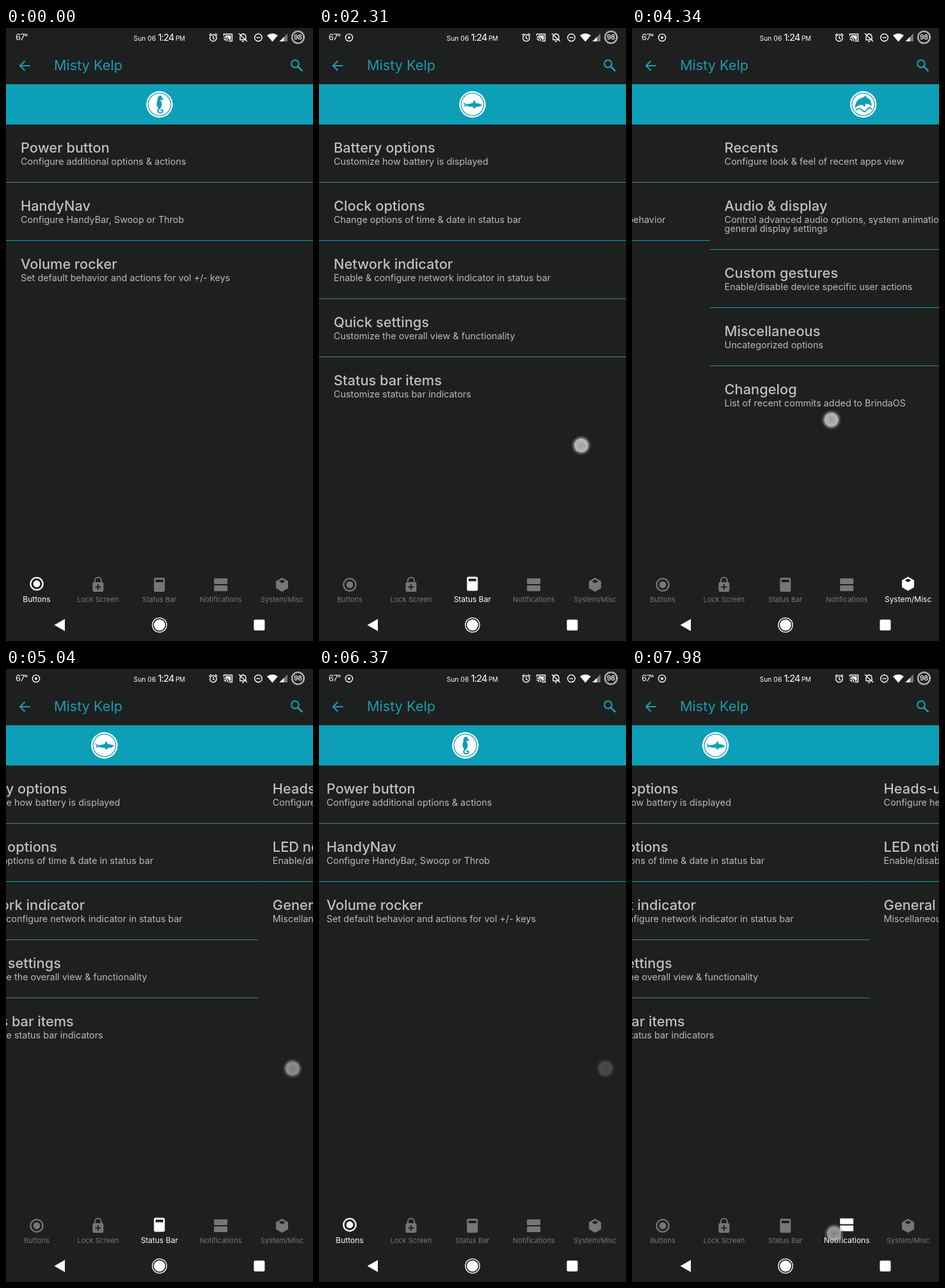
An HTML page for the animation above (8 s loop, 480 px wide and 959 px high).

```html
<!DOCTYPE html>
<html lang="en">
<head>
<meta charset="utf-8">
<title>Settings pager</title>
<style>
  html, body { margin: 0; width: 100%; height: 100%; overflow: hidden; background: #1d201f; }
  svg { display: block; width: 100%; height: 100%; font-family: Inter, "Open Sans", sans-serif; }
  .accent { fill: #1b9bb0; }
  .line { fill: none; stroke: currentColor; }
  .title { font-size: 21.8px; font-weight: 500; fill: #bec1bf; }
  .note { font-size: 14.4px; fill: #b8bbb9; }
  .tab { color: #747776; fill: currentColor; }
  .tab text { font-size: 11px; text-anchor: middle; }
  .tab.on { color: #fff; }
  .tab.on text { font-size: 12px; }
  .tab.on .icon { transform: translateY(-1.5px); }
  .status { color: #fff; fill: currentColor; }
  .hole { fill: #1d201f; }
  .badge { color: #0d9fb7; fill: currentColor; }
</style>
</head>
<body>
<svg viewBox="0 0 480 959" preserveAspectRatio="none">
  <defs>
    <radialGradient id="glow">
      <stop offset="0" stop-color="#a4a6a4" stop-opacity=".95"/>
      <stop offset=".62" stop-color="#bfc1bf" stop-opacity=".95"/>
      <stop offset=".72" stop-color="#a5a7a5" stop-opacity=".6"/>
      <stop offset="1" stop-color="#777" stop-opacity="0"/>
    </radialGradient>
  </defs>
  <rect width="480" height="959" fill="#1d201f"/>

  <g class="status">
    <text x="15" y="19" font-size="13" letter-spacing="-.9">67°</text>
    <g id="recording">
      <circle class="line" cx="47" cy="15" r="5.6" stroke-width="1.4"/>
      <circle cx="47" cy="15" r="2"/>
    </g>
    <text x="199.5" y="19.5" font-size="10.4">Sun 06</text>
    <text x="237.5" y="19.5" font-size="15" letter-spacing="-1">1:24</text>
    <text x="265" y="19.5" font-size="10" letter-spacing="-.3">PM</text>
    <g class="line" stroke-width="1.4">
      <circle cx="324" cy="15.5" r="5.2"/>
      <path d="M324 12v4l2.5 1.5M317.5 11.5l3.5-3M330.5 11.5l-3.5-3"/>
      <path d="M340.5 12V9.5h13v11h-5M340.5 14a7 7 0 0 1 6.5 6.5M340.5 17a4 4 0 0 1 3.5 3.5"/>
      <path d="M366 18.5v-4.5q0-4.5 4.5-4.5t4.5 4.5v4.5zM364 8.5l13 12.5M370.5 8v1.5M369 21h3"/>
      <circle cx="394.5" cy="15" r="5.8"/>
      <path d="M391.5 15h6"/>
    </g>
    <path d="M343 11.5h8.5v7H349q-1-4-6-5z"/>
    <path d="M408 11.5q8.5-6 17 0l-8.500 10z"/>
    <path d="M440 8.5v12.5h-12.5z" opacity=".4"/>
    <path d="M434.500 14v7h-7z"/>
    <circle class="line" cx="456.5" cy="14.5" r="9.3" stroke-width="2.6" stroke-dasharray="1.5 .84"/>
    <text x="456.2" y="18.4" font-size="10.8" font-weight="500" text-anchor="middle" letter-spacing="-.5">98</text>
  </g>

  <g class="accent" color="#1b9bb0">
    <path class="line" d="M37.5 59H22.5M29.5 51.5L22 59l7.5 7.5" stroke-width="2.2"/>
    <text x="75" y="66" font-size="21.7">Misty Kelp</text>
    <circle class="line" cx="452" cy="56" r="5.8" stroke-width="2.2"/>
    <path class="line" d="M456 60l7.5 7.5" stroke-width="2.6"/>
  </g>

  <rect y="88" width="480" height="63" fill="#0d9fb7"/>
  <g id="pages"></g>
  <g id="tabs"></g>

  <g fill="#fff">
    <path d="M92 924.5v19L75.5 934z"/>
    <circle cx="240" cy="934" r="8.8"/>
    <circle cx="240" cy="934" r="11.2" fill="none" stroke="#fff" stroke-width="1.3"/>
    <rect x="387.5" y="925.5" width="17" height="17" rx="2"/>
  </g>
  <circle id="touch" r="16" fill="url(#glow)"/>
</svg>

<script>
const WIDTH = 480, LOOP = 8000, STEP = 70, SLOP = 19, FADE = 250;

const pages = [
  { tab: 'Buttons',
    icon: '<circle class="line" r="9.6" stroke-width="2.3"/><circle r="5.4"/>',
    badge: `<path d="M-1-13Q4-15 4-10L7-7 1-7Q5-2 3 3 2 7-1 8L-3 4Q-6 0-3-6-4-10-1-13Z"/>
      <path class="line" d="M0 5Q-5 11 0 13 5 14 5 10 3 7 2 10" stroke-width="2"/>`,
    items: [['Power button', 'Configure additional options &amp; actions'],
      ['HandyNav', 'Configure HandyBar, Swoop or Throb'],
      ['Volume rocker', 'Set default behavior and actions for vol +/- keys']] },
  { tab: 'Lock Screen',
    icon: `<rect x="-8.5" y="-4" width="17" height="15" rx="2"/>
      <path class="line" d="M-5-3v-3.5a5 5 0 0 1 10 0V-3" stroke-width="2"/>
      <path class="hole" d="M-1-1h2v3.5h3.5v2H1V8h-2V4.5h-3.5v-2H-1z"/>`,
    badge: `<ellipse cx="3" cy="-6" rx="6.5" ry="6"/>
      <path class="line" d="M0-2Q-4 2-8 0T-13 3M1 0Q-3 8-10 7M3 0Q2 10-3 11M5-1Q4 8 9 10M7-2Q8 4 13 4" stroke-width="2.8"/>`,
    items: [['Lockscreen clocks', 'Customize your view of date &amp; time on the lockscreen'],
      ['Weather options', 'Configure lockscreen weather'],
      ['General options', 'Add or remove visual elements of your lockscreen']] },
  { tab: 'Status Bar',
    icon: `<rect x="-8.5" y="-11" width="17" height="22" rx="2.5"/>
      <rect class="hole" x="-6" y="-8" width="12" height="4"/>`,
    badge: '<path d="M-15-4L-10 0Q-4-1 0-2L3-7 5-2Q11-2 15 1 12 4 6 4L2 7 1 4Q-5 4-10 2L-14 5-12 1Z"/>',
    items: [['Battery options', 'Customize how battery is displayed'],
      ['Clock options', 'Change options of time &amp; date in status bar'],
      ['Network indicator', 'Enable &amp; configure network indicator in status bar'],
      ['Quick settings', 'Customize the overall view &amp; functionality'],
      ['Status bar items', 'Customize status bar indicators']] },
  { tab: 'Notifications',
    icon: '<rect x="-10.5" y="-10" width="21" height="9" rx="1"/><rect x="-10.5" y="1" width="21" height="9" rx="1"/>',
    badge: `<path d="M-15-4L-8 0Q-5-5 0-6 7-7 10-2L13 1Q11 6 6 8L2 11 0 8Q-5 8-8 4L-14 7-13 1Z"/>
      <circle cx="12" cy="-5" r="1.2"/><circle cx="13.5" cy="-2" r=".8"/>`,
    items: [['Heads-up', 'Configure heads-up options'],
      ['LED notifications', 'Enable/disable the LED light. Configure colors &amp; behavior'],
      ['General notifications', 'Miscellaneous notification controls']] },
  { tab: 'System/Misc',
    icon: '<path d="M0-11L9.5-5.5v11L0 11-9.5 5.5v-11z"/><path class="hole" d="M0-8L5-5.2 0-2.4-5-5.2z"/>',
    badge: `<path d="M-13 6Q-13-8 0-11L4-14 5-11Q13-8 13 3 9-1 4-1L2 4-1 1Q-8 0-13 6Z"/>
      <path class="line" d="M-12 9Q-6 4-2 9T6 8 13 8" stroke-width="2"/>`,
    items: [['Recents', 'Configure look &amp; feel of recent apps view'],
      ['Audio &amp; display', 'Control advanced audio options, system animations &amp;', 'general display settings'],
      ['Custom gestures', 'Enable/disable device specific user actions'],
      ['Miscellaneous', 'Uncategorized options'],
      ['Changelog', 'List of recent commits added to BrindaOS']] }
];

const brightRules = [332, 437];

function pageMarkup({ badge, items }, index) {
  let top = 151, body = '';
  items.forEach(([title, ...notes], i) => {
    body += `<text class="title" x="23" y="${top + 43.5}">${title}</text>`;
    notes.forEach((note, n) => {
      body += `<text class="note" x="23" y="${top + 63 + 14 * n}">${note}</text>`;
    });
    top += 77 + 14 * notes.length;
    if (i < items.length - 1) {
      const y = top - 1;
      const color = brightRules.includes(y) ? '#129bb0' : '#4d838a';
      body += `<rect y="${y}" width="${WIDTH}" height="1" fill="${color}"/>`;
    }
  });
  return `<g transform="translate(${index * WIDTH})">
    <g class="badge" transform="translate(240 119.5)">
      <circle r="20.7" fill="#fff"/><circle class="line" r="17.7" stroke-width="1.2"/>${badge}
    </g>${body}</g>`;
}

const tabMarkup = ({ tab, icon }, i) =>
  `<g class="tab" transform="translate(${48 + i * 95.9} 871)"><g class="icon">${icon}</g><text y="27">${tab}</text></g>`;

const $ = id => document.getElementById(id);
$('pages').innerHTML = pages.map(pageMarkup).join('');
$('tabs').innerHTML = pages.map(tabMarkup).join('');
const tabs = [...$('tabs').children];

const forward = (down, from) =>
  ({ down, up: down + 260, x0: 410, y0: 653, x1: 142, y1: 645, from, to: from + 1, settle: 400 });
const back = (down, from) =>
  ({ down, up: down + 240, x0: 171, y0: 627, x1: 448, y1: 625, from, to: from - 1, settle: 400 });
const tap = (down, up, x, from, to) =>
  ({ down, up, x0: x, y0: 883, x1: x, y1: 883, from, to, settle: 100 * (to - from + 1) });

const gestures = [
  forward(700, 0), forward(1500, 1), forward(2310, 2), forward(3430, 3),
  back(4169, 4), back(4731, 3), back(5350, 2), back(5950, 1),
  tap(6720, 7030, 135, 0, 1), tap(7490, 7928, 316, 1, 3)
];

const clamp = v => Math.max(0, Math.min(1, v));

function pose(t) {
  const g = gestures.findLast(g => g.down <= t);
  if (!g) return { position: 0, tab: 0, x: 0, y: 0, alpha: 0 };
  const e = clamp((t - g.down) / (g.up - g.down)) ** 2;
  const travel = (g.x1 - g.x0) * e;
  const pulled = Math.sign(travel) * Math.max(0, Math.abs(travel) - SLOP);
  const dragged = g.from - pulled / WIDTH;
  const rest = (1 - clamp((t - g.up) / g.settle)) ** 5;
  const bow = Math.abs(g.x1 - g.x0) / 5.3 * e * (1 - e);
  return {
    position: g.to + (dragged - g.to) * rest,
    tab: t >= g.up ? g.to : g.from,
    x: g.x0 + travel,
    y: g.y0 + (g.y1 - g.y0) * e - bow,
    alpha: 1 - clamp((t - g.up) / FADE)
  };
}

function draw(t) {
  const p = pose(t);
  $('pages').setAttribute('transform', `translate(${-p.position * WIDTH})`);
  tabs.forEach((tab, i) => tab.classList.toggle('on', i === p.tab));
  $('touch').setAttribute('transform', `translate(${p.x} ${p.y})`);
  $('touch').setAttribute('opacity', p.alpha);
  $('recording').setAttribute('opacity', t >= 210 ? 1 : 0);
}

// The picture advances in steps, like the screen recording it shows.
const begin = performance.now();
function tick() {
  const t = (performance.now() - begin) % LOOP;
  draw(Math.floor(t / STEP) * STEP);
  requestAnimationFrame(tick);
}
tick();
</script>
</body>
</html>
```
